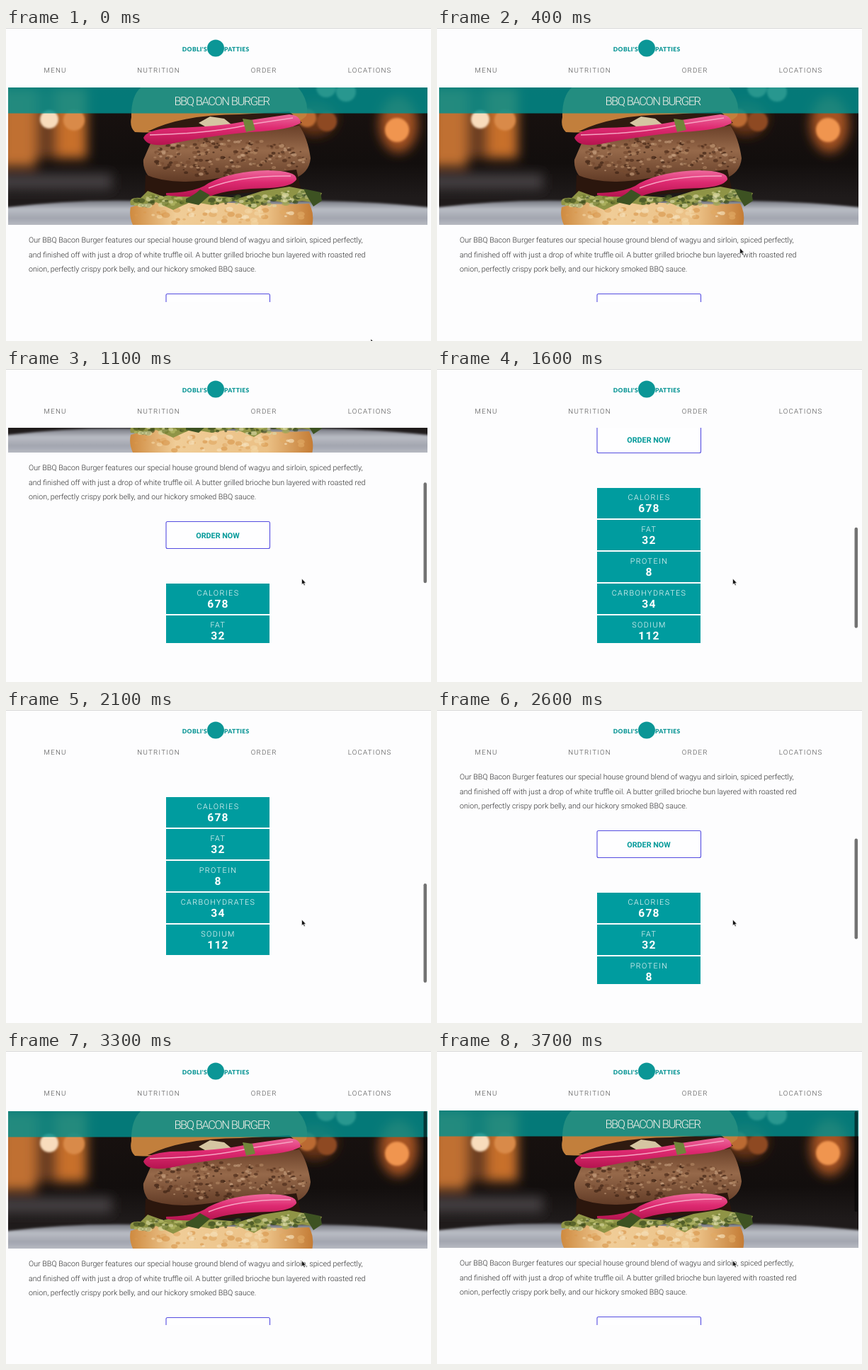
An HTML page that plays this animation: 600x442 px, repeating every 3.8 s.

```html
<!DOCTYPE html>
<html lang="en">
<head>
<meta charset="utf-8">
<title>Burger menu</title>
<style>
  html, body { margin: 0; width: 100%; height: 100%; overflow: hidden; background: #fdfdfe; }
  svg.stage { display: block; width: 100%; height: 100%; }
  text { font-family: Roboto, sans-serif; font-weight: 300; text-rendering: geometricPrecision; }
  .logo { font: 900 8.5px Lato, sans-serif; letter-spacing: .35px; fill: #0b9696; }
  .nav { font-size: 9.7px; letter-spacing: 1.25px; fill: #484848; }
  .title { font-size: 16.6px; letter-spacing: -1.55px; word-spacing: 1px; fill: #f4f1ea; }
  .copy { font-size: 10.7px; fill: #2c2c2c; }
  .order { font-size: 10.8px; font-weight: 700; fill: #009999; }
  .label { font-size: 10.8px; letter-spacing: 1.4px; fill: #fff; }
  .value { font-size: 15.6px; font-weight: 700; letter-spacing: 1.2px; fill: #fff; }
  .mid { text-anchor: middle; }
</style>
</head>
<body>
<svg class="stage" viewBox="0 0 600 442">
  <defs>
    <filter id="soft" x="-50%" y="-50%" width="200%" height="200%"><feGaussianBlur stdDeviation="1.6"/></filter>
    <filter id="haze" x="-50%" y="-50%" width="200%" height="200%"><feGaussianBlur stdDeviation="8"/></filter>
    <linearGradient id="room" x2="0" y2="1">
      <stop offset="0" stop-color="#1a1210"/><stop offset=".55" stop-color="#120e0d"/>
      <stop offset=".8" stop-color="#1f1b1b"/>
    </linearGradient>
    <linearGradient id="plate" x2="0" y2="1">
      <stop offset="0" stop-color="#74767f"/><stop offset=".3" stop-color="#b9bcc4"/>
      <stop offset=".6" stop-color="#a2a5af"/><stop offset="1" stop-color="#c4c7cf"/>
    </linearGradient>
    <linearGradient id="meat" x2="0" y2="1">
      <stop offset="0" stop-color="#6a4029"/><stop offset=".4" stop-color="#96694a"/>
      <stop offset="1" stop-color="#57321f"/>
    </linearGradient>
    <linearGradient id="onion" x2="0" y2="1">
      <stop offset="0" stop-color="#ee6a9d"/><stop offset=".45" stop-color="#de2a71"/>
      <stop offset="1" stop-color="#b5144f"/>
    </linearGradient>
    <linearGradient id="bun" x2="1" y2="0">
      <stop offset="0" stop-color="#cf8a3f"/><stop offset=".25" stop-color="#f0cd98"/>
      <stop offset=".75" stop-color="#ebc085"/><stop offset="1" stop-color="#c47c35"/>
    </linearGradient>
  </defs>

  <svg y="83" width="600" height="304" viewBox="0 83 600 304">
    <g id="page">
      <svg x="3" y="84" width="592" height="194" viewBox="3 84 592 194">
        <path fill="url(#room)" d="M3 84h592v194H3z"/>
        <g filter="url(#haze)">
          <path fill="#c06f30" d="M-10 84H42V196H-10z"/>
          <path fill="#c8702c" d="M72 84h42v100H72z"/>
          <path fill="#6b3d20" d="M42 84h30v100H42z"/>
          <path fill="#454142" d="M-10 206H150v22H-10z"/>
          <ellipse cx="554" cy="136" rx="27" ry="40" fill="#a65322"/>
          <ellipse cx="436" cy="128" rx="30" ry="24" fill="#6b3418"/>
        </g>
        <g filter="url(#soft)">
          <circle cx="61" cy="129" r="13" fill="#f8dcbc"/>
          <circle cx="96" cy="130" r="15" fill="#d98a48"/>
          <circle cx="425" cy="127" r="13" fill="#bb6a30"/>
          <circle cx="453" cy="132" r="14" fill="#8e4a22"/>
          <circle cx="452" cy="84" r="14" fill="#d9b088"/>
          <circle cx="480" cy="90" r="14" fill="#e0b890"/>
          <circle cx="552" cy="144" r="17" fill="#f0954f"/>
          <path fill="url(#plate)" d="M-5 254Q90 242 185 244H425Q510 244 605 254V285H-5z"/>
        </g>
        <path fill="#c27f3c" d="M177 126Q176 84 205 76H405Q430 100 424 124Q412 138 365 140L300 138Q240 150 182 147Q174 140 177 126z"/>
        <path fill="#2f1a10" d="M200 146Q250 122 330 122L400 118 418 134 340 146z"/>
        <path fill="#d5c5a2" d="M272 134l16-9 20 3 10 8-30 7z"/>
        <path fill="url(#meat)" d="M204 163Q240 148 320 148L414 138Q426 155 430 184Q428 205 406 213L220 226Q192 208 194 186z"/>
        <g id="crumbs"></g>
        <path fill="#2b160d" d="M197 207Q235 224 300 212L410 200 416 226 260 240 196 234z"/>
        <path fill="url(#onion)" d="M194 155Q198 144 232 141Q305 140 345 130L400 122Q415 123 416 134Q402 144 345 147Q290 152 240 162Q200 171 194 155z"/>
        <path fill="none" stroke="#f6a3c2" stroke-width="1.500" d="M203 151Q290 149 345 136L405 127"/>
        <path fill="#71853a" d="M334 128l14 2 4 14-13 3z"/>
        <path fill="url(#bun)" d="M176 253Q220 240 300 246Q370 250 428 248Q436 262 432 280H180Q173 266 176 253z"/>
        <g id="crust"></g>
        <path fill="#8f9446" d="M176 250Q172 238 190 240L200 230 222 238 240 233 280 236 330 240 362 230 400 224 446 233 440 247 418 244 395 247 372 243 350 256 322 244 290 250 262 245 236 257 212 246 196 252z"/>
        <path fill="url(#onion)" d="M226 233Q270 232 286 219Q320 202 370 201Q412 202 410 214Q404 224 372 226Q315 227 290 237Q250 240 226 236z"/>
        <path fill="none" stroke="#f6a3c2" stroke-width="1.500" d="M286 226Q330 208 402 209"/>
        <g id="leaves"></g>
        <path fill="#3d5222" d="M254 241q12-5 20-13l14 8-7 6-9 8-18-4zM420 227l24 5 2 12-12 8-8-13z"/>
        <path fill="#00918f" fill-opacity=".82" d="M3 84h592v36.500H3z"/>
      </svg>
      <text class="title mid" x="304.500" y="108.800">BBQ BACON BURGER</text>
      <text class="copy" x="32" y="303">Our BBQ Bacon Burger features our special house ground blend of wagyu and sirloin, spiced perfectly,</text>
      <text class="copy" x="32" y="323.700">and finished off with just a drop of white truffle oil. A butter grilled brioche bun layered with roasted red</text>
      <text class="copy" x="32" y="344.400">onion, perfectly crispy pork belly, and our hickory smoked BBQ sauce.</text>
      <rect x="226" y="375.500" width="146.500" height="38" rx="2" fill="#fefeff" stroke="#544ce0" stroke-width="1.100"/>
      <text class="order mid" x="299" y="398.700">ORDER NOW</text>
      <g id="facts"></g>
    </g>
    <rect id="thumb" x="589.500" width="4.500" rx="2.250" fill="#000" fill-opacity=".55"/>
  </svg>

  <path fill="#d8d8d8" d="M0 0h600v1H0z"/>
  <text class="logo" x="284" y="33" text-anchor="end">DOBLI'S</text>
  <circle cx="296" cy="28.500" r="12" fill="#0b9696"/>
  <text class="logo" x="308" y="33">PATTIES</text>
  <text class="nav" x="53.500" y="63">MENU</text>
  <text class="nav" x="185.300" y="63">NUTRITION</text>
  <text class="nav" x="345.700" y="63">ORDER</text>
  <text class="nav" x="482.700" y="63">LOCATIONS</text>
  <path id="cursor" fill="#111" stroke="#fff" stroke-width=".6" d="M0 0V8.500L2 6.700 3.400 9.800 4.800 9.200 3.500 6.200H6z"/>
</svg>
<script>
const LOOP = 3800, STEP = 100;
const VIEW_TOP = 85, VIEW_END = 385, THUMB = 142, MAX = 336;
const $ = id => document.getElementById(id);

// scroll offset keys: [step, offset]
const KEYS = [[0, 0], [5, 0], [6, 8], [7, 33], [11, 160], [12, 195], [14, 250], [16, 295],
  [18, 327], [20, 342], [21, 340], [23, 336], [24, 336], [25, 300], [26, 205], [27, 90],
  [28, -14], [29, -29], [30, -20], [31, -10], [32, -4], [33, -1], [35, 0], [38, 0]];

function add(parent, tag, attrs, text = '') {
  const el = document.createElementNS('http://www.w3.org/2000/svg', tag);
  for (const k in attrs) el.setAttribute(k, attrs[k]);
  el.textContent = text;
  parent.append(el);
}

let seed = 7;
const rand = (a, b) => {
  seed = seed * 16807 % 2147483647;
  return a + (b - a) * seed / 2147483647;
};

function scatter(id, n, cx, cy, rx, ry, size, colors) {
  for (let i = 0; i < n; i++) {
    const a = rand(0, 2 * Math.PI), r = Math.sqrt(rand(0, 1)), s = rand(size / 3, size);
    add($(id), 'ellipse', {
      cx: cx + rx * r * Math.cos(a), cy: cy + ry * r * Math.sin(a), rx: s * 1.5, ry: s,
      fill: colors[i % colors.length], opacity: .65
    });
  }
}

scatter('crumbs', 260, 312, 183, 112, 27, 2.4, ['#4a2a18', '#b08562', '#744a30', '#c39c7c', '#3a2013']);
scatter('crust', 60, 304, 265, 122, 12, 4, ['#f6e2bd', '#d9984f', '#f3d6a4', '#e0a964']);
scatter('leaves', 40, 215, 245, 38, 8, 3.5, ['#d9d9a0', '#6f7a30', '#b7bb68', '#3c4a1c']);
scatter('leaves', 50, 345, 245, 58, 8, 3.5, ['#dcd9a8', '#4b5d28', '#a2a858', '#30401a']);
scatter('leaves', 40, 410, 238, 34, 8, 3.5, ['#cfd08a', '#5d7130', '#e2dfb0', '#394a20']);

[['CALORIES', 678], ['FAT', 32], ['PROTEIN', 8], ['CARBOHYDRATES', 34], ['SODIUM', 112]]
  .forEach(([label, value], i) => {
    const y = 463 + 45 * i, g = $('facts');
    add(g, 'rect', { x: 226, y, width: 146, height: 43, fill: '#009c9f' });
    add(g, 'text', { class: 'label mid', x: 299.5, y: y + 17 }, label);
    add(g, 'text', { class: 'value mid', x: 299.5, y: y + 34 }, value);
  });

function scrollAt(step) {
  const i = KEYS.findIndex(k => k[0] > step);
  const [s0, y0] = KEYS[i - 1], [s1, y1] = KEYS[i];
  return y0 + (y1 - y0) * (step - s0) / (s1 - s0);
}

function draw(now) {
  const step = Math.floor(now % LOOP / STEP);
  const y = scrollAt(step);
  $('page').setAttribute('transform', `translate(0 ${-y})`);

  const inside = Math.min(MAX, Math.max(0, y));
  const length = THUMB - Math.abs(y - inside) / 2;
  const top = y > MAX ? VIEW_END - length
    : VIEW_TOP + inside / MAX * (VIEW_END - VIEW_TOP - THUMB);
  $('thumb').setAttribute('y', top);
  $('thumb').setAttribute('height', length);
  $('thumb').setAttribute('opacity', step < 6 ? 0 : 1);

  const p = Math.min(1, step / 5), e = p * p * (3 - 2 * p);
  $('cursor').setAttribute('transform', `translate(${515 - 97.5 * e} ${439 - 143 * e})`);
}

const start = performance.now();
function frame() {
  draw(performance.now() - start);
  requestAnimationFrame(frame);
}
frame();
</script>
</body>
</html>
```
